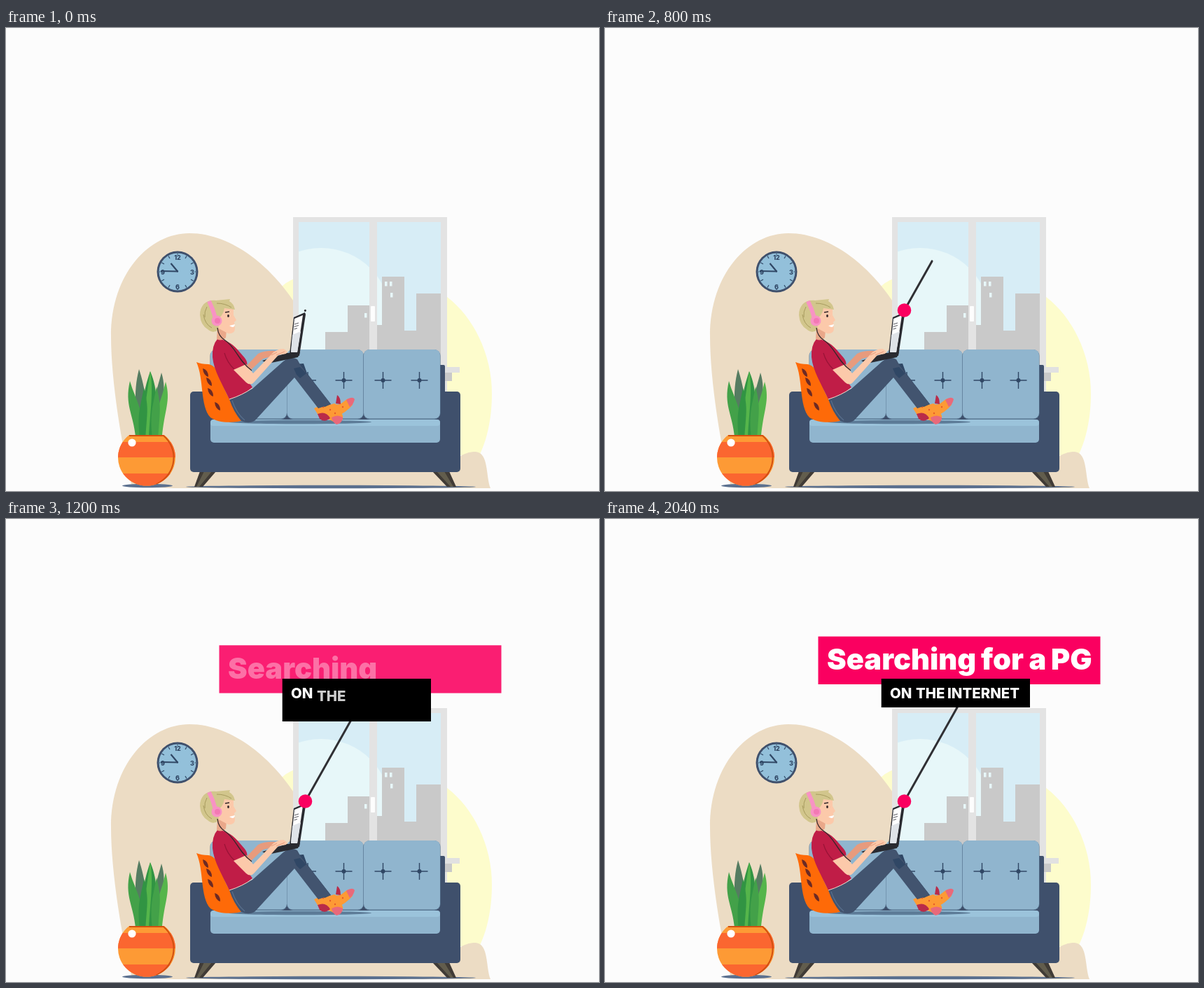
Recreate the animation shown at these times as an HTML page with a canvas. Size 847x661 px, loop 5920 ms.

```html
<!DOCTYPE html>
<html lang="en">
<head>
<meta charset="utf-8">
<title>Searching from the sofa</title>
<style>
html, body { margin: 0; width: 100%; height: 100%; overflow: hidden; background: #fcfcfc; }
canvas { display: block; width: 847px; height: 661px; }
</style>
</head>
<body>
<canvas id="stage" width="847" height="661"></canvas>
<script>
const W = 847, H = 661, LOOP = 5920, STEP = 40;
const ctx = document.getElementById('stage').getContext('2d');
const room = document.createElement('canvas');
room.width = W;
room.height = H;
const g = room.getContext('2d');

const NAVY = '#3f506c', BLUE = '#90b5ce', DEEP = '#304765', SKIN = '#fcc9aa',
  ORANGE = '#fd9a35', RED = '#fb6630', PINK = '#fa0060', BEIGE = '#ecdcc4';

function fill(color, d) {
  g.fillStyle = color;
  g.fill(new Path2D(d));
}
function stroke(color, width, d) {
  g.strokeStyle = color;
  g.lineWidth = width;
  g.stroke(new Path2D(d));
}
function box(color, x, y, w, h, r = 0) {
  g.fillStyle = color;
  g.beginPath();
  g.roundRect(x, y, w, h, r);
  g.fill();
}
function oval(color, x, y, rx, ry = rx) {
  g.fillStyle = color;
  g.beginPath();
  g.ellipse(x, y, rx, ry, 0, 0, Math.PI * 2);
  g.fill();
}
function clipped(d, draw) {
  g.save();
  g.clip(new Path2D(d));
  draw();
  g.restore();
}

function drawBackdrop() {
  box('#fcfcfc', 0, 0, W, H);
  fill('#fdfccc', 'M390 373Q400 362 412 358L630 384C667 412 694 465 694 522C694 560 686 590 676 610L400 610Z');
  fill(BEIGE, 'M180 655C166 600 150 505 150 440C150 350 205 293 262 293C325 293 384 345 418 401' +
    'C460 480 560 600 642 616C654 607 662 605 671 605C690 607 685 640 692 657L240 657Z');
}

function drawWindow() {
  box('#e3e3e3', 410, 270, 220, 250);
  clipped('M418 277H519V520H418ZM530 277H621V520H530Z', () => {
    box('#d7edf6', 410, 270, 220, 250);
    oval('#e7f7f9', 450, 414, 100);
    for (const [x, y, w] of [[456, 434, 32], [488, 396, 32], [529, 424, 8], [537, 355, 32], [569, 432, 17], [586, 379, 36]])
      box('#c9c9c9', x, y, w, 140);
    for (const [x, y] of [[512, 407], [541, 362], [548, 362], [549, 378]])
      box('#e7f7f9', x, y, 3.5, 6.5);
  });
  box('#fdfdfd', 521, 397, 6, 22, 1);
  box('#e1e1e1', 626, 484, 22, 8);
  box('#c9c9c9', 626, 492, 11, 12);
}

function drawClock() {
  oval(NAVY, 245, 348, 29.5);
  oval('#93c0da', 245, 348, 26.5);
  for (let i = 0; i < 12; i++) {
    const a = i * Math.PI / 6, c = Math.cos(a), s = Math.sin(a), r = i % 3 ? 22 : 24.5;
    stroke(DEEP, 1.2, `M${245 + c * 26} ${348 + s * 26}L${245 + c * r} ${348 + s * r}`);
  }
  g.fillStyle = DEEP;
  g.font = '800 9px Inter, sans-serif';
  g.textAlign = 'center';
  g.textBaseline = 'middle';
  [['12', 245, 328], ['3', 266, 349], ['6', 245, 370], ['9', 224, 349]].forEach(n => g.fillText(...n));
  stroke(DEEP, 1.8, 'M221 347L246 347.5');
  stroke(DEEP, 2.2, 'M235.5 336L245.5 348');
}

function drawPlant() {
  oval('#5b708f', 202, 653.5, 36, 2.8);
  const leaf = (color, tx, ty, bx, w) =>
    fill(color, `M${tx} ${ty}C${tx + w} ${ty + 28} ${bx + w} 545 ${bx + w * .6} 585` +
      `L${bx - w * .6} 585C${bx - w} 550 ${tx - w} ${ty + 35} ${tx} ${ty}Z`);
  leaf('#557c61', 190, 487, 195, 9);
  leaf('#557c61', 222, 492, 212, 9);
  leaf('#43a149', 177, 504, 190, 8);
  leaf('#55b54b', 228, 505, 218, 8);
  leaf('#319443', 206, 490, 204, 12);
  leaf('#55b54b', 206, 490, 201, 5);
  leaf('#319443', 197, 514, 195, 7);
  leaf('#43a149', 215, 512, 213, 7);

  clipped('M176 581H226A41 40.5 0 1 1 176 581Z', () => {
    box(ORANGE, 155, 580, 92, 76);
    box(RED, 155, 591, 92, 22);
    box(RED, 155, 636, 92, 22);
    stroke('#d2500f', 2, 'M176 582H225C246 600 246 635 214 652');
  });
  oval('#fff', 180, 592, 5.6);
}

function drawSofa() {
  oval('#5b708f', 464, 655, 207, 2.2);
  fill('#403b36', 'M277 633H300L281 655H269Z');
  fill('#625d4d', 'M283 633H294L276 655H272Z');
  fill('#403b36', 'M609 633H633L643 655H630Z');
  fill('#625d4d', 'M615 633H626L639 655H635Z');
  box(NAVY, 296, 481, 331, 90, 2);
  box(NAVY, 263, 519, 386, 115, 5);
  for (let i = 0; i < 3; i++) {
    box('#587692', 291.5 + i * 109.5, 459, 110, 100, 9);
    box(BLUE, 292 + i * 109.5, 459, 109, 98.5, 8);
  }
  for (const x of [431, 482.5, 538.5, 590.5]) {
    stroke(DEEP, 1.4, `M${x - 12} 503H${x + 12}M${x} 491V515`);
    oval(DEEP, x, 503, 3);
  }
  box(BLUE, 292, 559, 328, 33, 5);
  box('#9bc3db', 292, 559, 328, 9, 4);
  oval('#5d7c98', 420, 562.5, 102, 2.8);
}

function drawPillow() {
  fill('#fe6a08', 'M272 477Q279 480 289 480C301 482 305 496 310 510C317 530 329 545 341 559' +
    'C326 565 303 564 292 556C277 540 283 501 272 477Z');
  for (const [x, y] of [[285, 492], [290, 505], [292, 520], [302, 540]])
    fill('#6c2a24', `M${x - 4} ${y - 6}Q${x + 4} ${y - 4} ${x + 4} ${y + 6}Q${x - 3} ${y + 4} ${x - 4} ${y - 6}Z`);
}

function drawLegs() {
  // far foot
  fill(ORANGE, 'M456 540L469 536C477 541 482 532 489 529Q497 528 495 538Q486 549 470 556L460 556Z');
  fill('#e9697a', 'M486 531Q495 525 498 530Q496 538 491 541Z');
  fill('#b92b49', 'M471 536L473 524Q478 527 478 537Z');
  // near foot
  fill(ORANGE, 'M440 543L460 534Q467 542 475 547Q484 552 480 560Q472 566 464 560L448 556Z');
  fill('#b92b49', 'M445 551Q457 546 463 557Q455 564 448 558Z');
  fill('#e9697a', 'M465 556Q474 551 481 556Q480 565 472 566Q466 563 465 556Z');
  for (const [x, y] of [[453, 541], [463, 545], [470, 550], [481, 541]]) oval('#e65c2b', x, y, 1.2);

  fill(DEEP, 'M399 481L425 479L430 493L464 537L455 541L408 493Z');
  fill('#42546f', 'M319 530L352 515L396 476Q407 468 416 473L421 482L464 537L446 543L412 499L356 560' +
    'Q348 566 336 561Q325 548 319 530Z');
  fill(DEEP, 'M411 486L420 484L429 493L420 500L415 495Z');
  stroke('#58708d', 1.2, 'M323 532Q329 550 341 560');
}

function drawBody() {
  // far arm
  fill('#e79b7d', 'M341 485L360 465Q370 460 386 461L384 468L367 472L350 488Z');
  fill('#c01d47', 'M302 444C315 444 326 453 334 463C340 470 346 475 344 482L335 488L352 513Q337 525 319 530' +
    'C309 508 297 490 295 470Q294 453 302 444Z');
  stroke('#991337', 1.2, 'M312 464Q316 478 326 487');
  stroke('#f7d8c8', 1, 'M319 530Q338 524 352 514');
}

function drawLaptop() {
  fill('#292a30', 'M366 475L401 464L420 463L417 470L374 479Z');
  fill('#292a30', 'M405 465L411 413L427 406L428 409L419 468Z');
  fill('#fff', 'M407 462L412 415L424 410L416 463Z');
  fill('#dfe3e8', 'M409 438L421 433L416 463L407 463Z');
  stroke('#55555c', 1, 'M412 423L418 421M411.5 426.5L418 424.5M411.5 430L416 428.5');
}

function drawArm() {
  fill(SKIN, 'M325 488L343 480L353 493L379 466Q386 458 396 458Q404 461 400 465L389 467L354 506Q349 511 343 506Z');
  stroke('#e79b7d', 1, 'M379 467L387 463M386 467L398 462');
}

function drawHead() {
  fill('#eaa88a', 'M302 428L315 432L314 442Q308 448 301 444Z');
  fill(SKIN, 'M300 398L325 401L325 410L329 417L326 420L327 430Q326 437 317 436L302 428Z');
  fill('#d2c68c', 'M277 410C277 395 287 387 300 389L320 387L319 390Q325 393 327 402L312 400Q310 410 305 413' +
    'L303 431Q296 437 288 430Q278 424 277 410Z');
  stroke('#a89b5f', 1, 'M282 409Q284 423 294 428M301 393Q313 393 322 399M287 398Q283 405 284 413');
  stroke('#33282a', 1.4, 'M313 406L319 405');
  oval('#33282a', 317.5, 411, 1.4, 2);
  fill('#fff', 'M319 425L327 423Q326 430 319 425Z');
  stroke('#f893c4', 6, 'M290 390Q296 402 299 414');
  oval('#f893c4', 301, 418, 7.5);
  oval('#f37ab4', 302, 418, 4);
  stroke('#33282a', 1.3, 'M302 428C303 438 308 443 313 446C328 455 332 476 351 489');
}

const clamp = v => Math.min(1, Math.max(0, v));
const ease = (t, start, span) => (1 - Math.cos(Math.PI * clamp((t - start) / span))) / 2;
const RISE = 21;

function panel(color, x, y, w, bottom, e) {
  const top = y + RISE * (1 - e);
  ctx.globalAlpha = clamp(e * 2.2);
  ctx.fillStyle = color;
  ctx.fillRect(x, top, w, bottom - top);
  ctx.globalAlpha = 1;
}

function words(font, baseline, t, list) {
  ctx.font = font;
  ctx.fillStyle = '#fff';
  for (const [text, x, start, span] of list) {
    const e = ease(t, start, span);
    ctx.globalAlpha = e;
    ctx.fillText(text, x, baseline + RISE * (1 - e));
  }
  ctx.globalAlpha = 1;
}

function render(t) {
  ctx.drawImage(room, 0, 0);

  const reach = ease(t, 620, 360);
  ctx.strokeStyle = '#303034';
  ctx.lineWidth = 3;
  ctx.lineCap = 'round';
  ctx.beginPath();
  ctx.moveTo(427.3, 403.5);
  ctx.lineTo(427.4 + 79.3 * reach, 403.4 - 141 * reach);
  ctx.stroke();

  ctx.fillStyle = PINK;
  ctx.beginPath();
  ctx.arc(427.5, 403, 9.8 * ease(t, 40, 480), 0, Math.PI * 2);
  ctx.fill();

  // panel bottoms lag behind their tops and settle in hard cuts
  const title = ease(t, 960, 550);
  const titleEnd = t >= 1640 ? 236 : Math.max(t >= 1240 ? 247.5 : 0, 236 + RISE * (1 - title));
  panel(PINK, 304.5, 167.7, 403, titleEnd, title);
  words('900 41.6px Inter, sans-serif', 214.5, t, [
    ['Searching', 317, 1091, 260], ['for', 537, 1200, 240], ['a', 605.5, 1230, 240], ['PG', 637, 1430, 480]
  ]);

  const subEnd = t < 1320 ? 289 : t < 1640 ? 273 : 269;
  panel('#000', 394.7, 228, 212.3, subEnd, ease(t, 921, 260));
  words('800 20.4px Inter, sans-serif', 256, t, [
    ['ON', 407, 927, 260], ['THE', 444, 1017, 260], ['INTERNET', 489, 1297, 260]
  ]);
}

[drawBackdrop, drawWindow, drawClock, drawPlant, drawSofa, drawPillow,
  drawLegs, drawBody, drawLaptop, drawArm, drawHead].forEach(draw => draw());

const began = performance.now();
function tick() {
  const t = (performance.now() - began) % LOOP;
  render(Math.floor(t / STEP) * STEP);
  requestAnimationFrame(tick);
}
tick();
</script>
</body>
</html>
```
